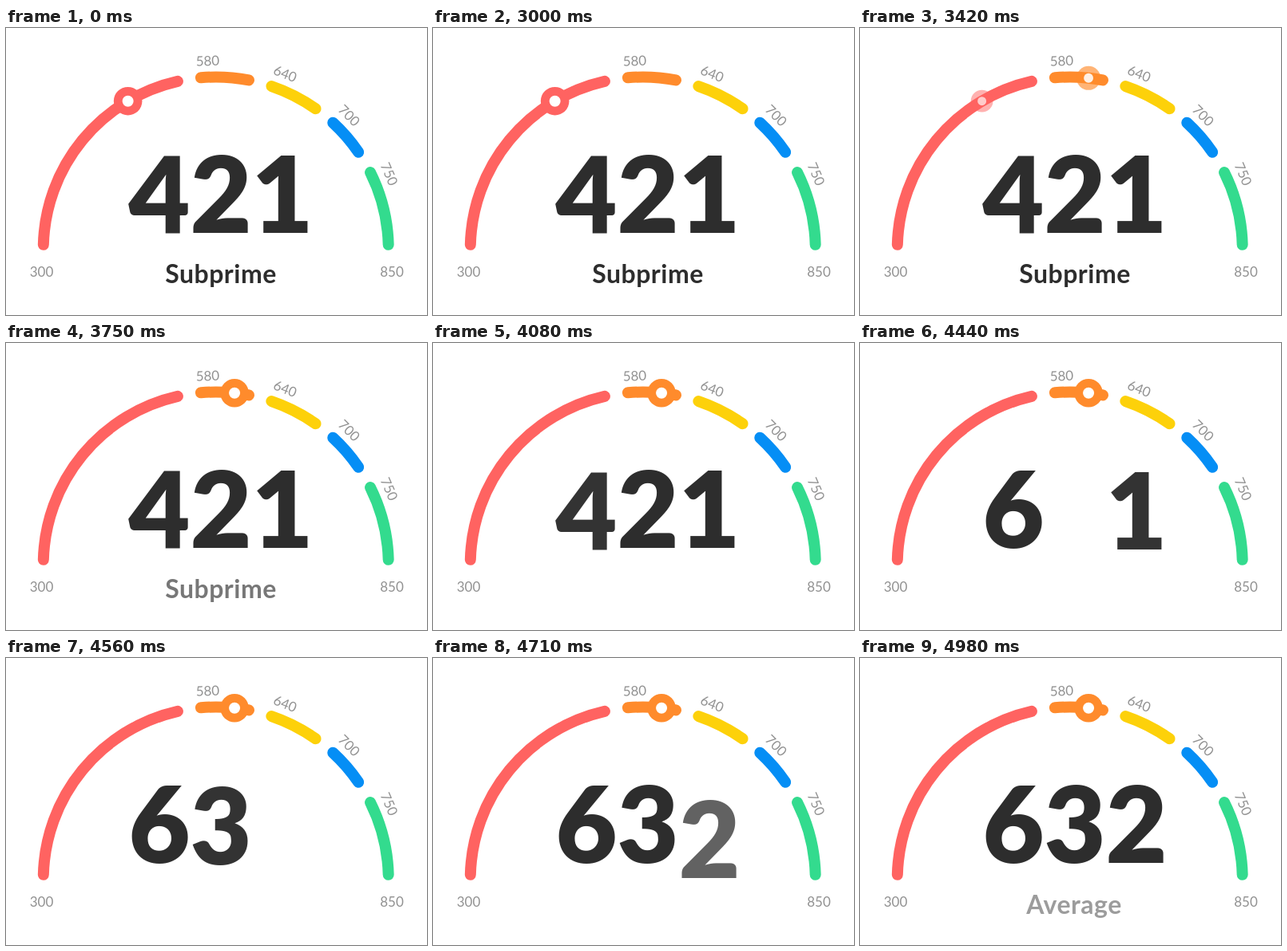
An HTML page for the animation above (5010 ms loop, 527 by 360 pixels).

```html
<!DOCTYPE html>
<html lang="en">
<head>
<meta charset="utf-8">
<title>Score gauge</title>
<style>
  html, body { margin: 0; width: 100%; height: 100%; overflow: hidden; background: #fff; }
  svg { display: block; width: 527px; height: 360px; }
  text { font-family: Lato, "Open Sans", sans-serif; text-anchor: middle; }
  .arc { fill: none; stroke-width: 14; stroke-linecap: round; }
  .tick { font-size: 17px; fill: #929292; }
  .digit { font-size: 133px; font-weight: 900; fill: #2d2d2d; }
  .grade { font-size: 32px; font-weight: 700; fill: #2d2d2d; letter-spacing: .5px; }
</style>
</head>
<body>
<svg id="stage" viewBox="0 0 527 360"></svg>
<script>
const LOOP = 5010, STEP = 30;
const CX = 262.75, CY = 277.5, R = 216;
const RED = '#ff6361', ORANGE = '#ff8b2c';
const stage = document.getElementById('stage');

function add(tag, attrs, content = '') {
  const el = document.createElementNS('http://www.w3.org/2000/svg', tag);
  set(el, attrs);
  el.textContent = content;
  stage.appendChild(el);
  return el;
}
function set(el, attrs) {
  for (const key in attrs) el.setAttribute(key, attrs[key]);
}
// Angles run clockwise in degrees, with zero at the top of the dial.
function polar(deg, r = R) {
  const a = deg * Math.PI / 180;
  return [CX + r * Math.sin(a), CY - r * Math.cos(a)];
}
const clamp = v => Math.min(1, Math.max(0, v));
const progress = (t, start, length) => clamp((t - start) / length);
const easeInOut = p => p < .5 ? 4 * p ** 3 : 1 - 4 * (1 - p) ** 3;
const easeOut = p => 1 - (1 - p) ** 1.5;

// Dial
[
  [-88.5, -12.8, RED],
  [-5, 11, ORANGE],
  [18.8, 35.3, '#fdd10a'],
  [42.7, 55.7, '#058ef5'],
  [63.5, 88.5, '#33db8e']
].forEach(([from, to, stroke]) => add('path', {
  class: 'arc', stroke,
  d: `M${polar(from)} A${R} ${R} 0 0 1 ${polar(to)}`
}));

[[580, -2.5], [640, 21.5], [700, 44.8], [750, 66.5]].forEach(([value, deg]) => {
  const [x, y] = polar(deg, 230.5);
  add('text', { class: 'tick', x, y, transform: `rotate(${deg} ${x} ${y})` }, value);
});
add('text', { class: 'tick', x: 44.5, y: 311.5 }, 300);
add('text', { class: 'tick', x: 483, y: 311.5 }, 850);

// Knobs
function knob(deg, color) {
  const [cx, cy] = polar(deg);
  const ring = add('circle', { cx, cy, fill: color });
  const hole = add('circle', { cx, cy, fill: '#fff' });
  return k => {
    const scale = .56 + .44 * k;
    set(ring, { r: 17.8 * scale, opacity: k });
    set(hole, { r: 7 * scale, opacity: clamp(1.35 * k) });
  };
}
const oldKnob = knob(-30.65, RED);
const newKnob = knob(6.2, ORANGE);

// Score and grade
const BASE = 256.5, DROP = 75, SLIDE = 150, GAP = 60;
const digits = [['4', '6'], ['2', '3'], ['1', '2']].map((pair, i) => ({
  pair,
  start: 4050 + i * 180,
  el: add('text', { class: 'digit', x: 192 + i * 77 })
}));
const oldGrade = add('text', { class: 'grade', x: 269, y: 320 }, 'Subprime');
const newGrade = add('text', { class: 'grade', x: 268, y: 320.5 }, 'Average');

function drawDigit({ pair, start, el }, t) {
  const enter = start + SLIDE + GAP;
  const arriving = t >= enter;
  const p = easeInOut(progress(t, arriving ? enter : start, SLIDE));
  const shown = arriving ? p : 1 - p;
  el.textContent = pair[+arriving];
  set(el, { y: BASE + DROP * (1 - shown), opacity: shown });
}

function draw(t) {
  oldKnob(1 - progress(t, 3150, 540));
  newKnob(easeOut(progress(t, 3150, 540)));
  digits.forEach(d => drawDigit(d, t));
  set(oldGrade, { opacity: 1 - progress(t, 3600, 420) });
  set(newGrade, { opacity: progress(t, 4770, 450) });
}

const origin = performance.now();
function tick() {
  const t = Math.max(0, performance.now() - origin) % LOOP;
  draw(Math.floor(t / STEP) * STEP);
  requestAnimationFrame(tick);
}
tick();
</script>
</body>
</html>
```
